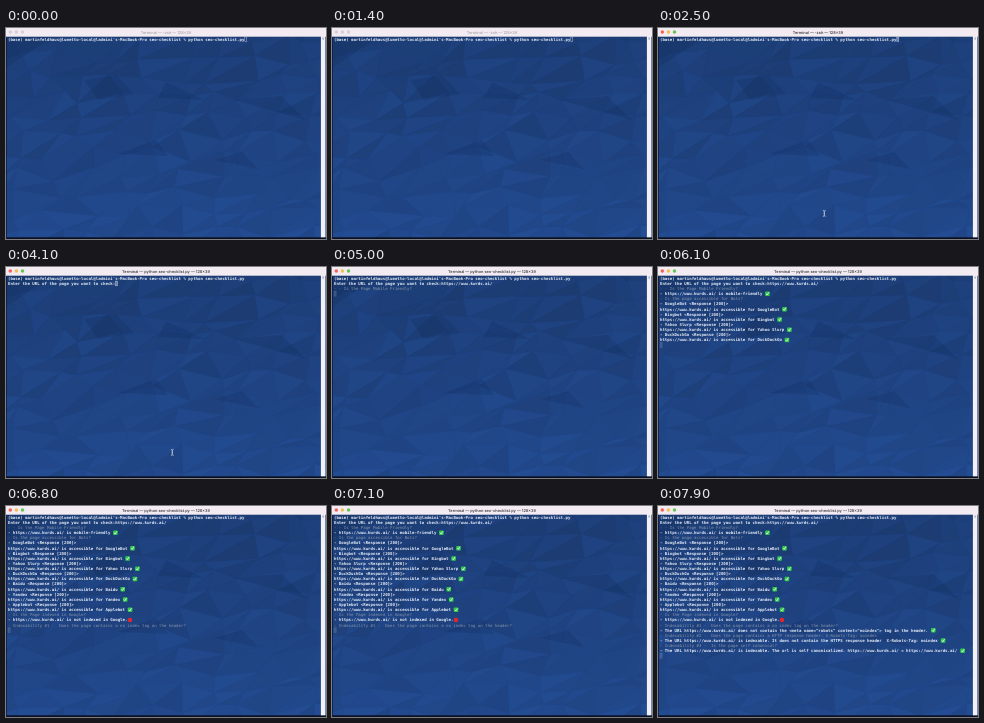
Write an HTML page that moves like this. It is 320 by 211 pixels and loops after 8000 ms.

```html
<!DOCTYPE html>
<html lang="en">
<head>
<meta charset="utf-8">
<title>Terminal</title>
<style>
html, body { margin: 0; width: 100%; height: 100%; overflow: hidden; background: #1c4286; }
svg { display: block; width: 100vw; height: 100vh; }
text { white-space: pre; text-rendering: geometricPrecision; }
.line { font: bold 4.05px "DejaVu Sans Mono", monospace; fill: #e6ecf8; }
.dim { font-weight: normal; fill: #8793a8; }
#title { font: 600 3.9px Inter, sans-serif; text-anchor: middle; }
</style>
</head>
<body>
<svg id="stage" viewBox="0 0 320 211" preserveAspectRatio="none">
  <g id="wall"></g>
  <rect y="209.3" width="320" height="1.7" fill="#0a1022"/>
  <rect y="8" width=".8" height="203" fill="#0e1c40"/>
  <rect x="314.9" y="8" width="4.5" height="201.3" fill="#f3f1f5"/>
  <rect width="320" height="8.7" fill="#f3ebf2"/>
  <rect x="316.3" y="9.3" width="1.7" height="2.6" rx=".8" fill="#b9b7bd"/>
  <g id="lights"></g>
  <text id="title" x="160" y="5.5"></text>
  <g id="screen"></g>
  <rect id="cursor" width="2" height="4.7" stroke="#b4bfd2" stroke-width=".5"/>
  <path id="mouse" d="M164.9 182.4q1.4 0 1.4 1v4q0 1-1.4 1M167.7 182.4q-1.4 0-1.4 1v4q0 1 1.4 1" fill="none" stroke="#c3cde0" stroke-width=".7"/>
</svg>
<script>
const LOOP = 8000, COL = 2.44, ROW = 5.13, LEFT = 2, TOP = 8.9;
const $ = id => document.getElementById(id);

function add(parent, tag, attrs, text = "") {
  const el = document.createElementNS("http://www.w3.org/2000/svg", tag);
  for (const k in attrs) el.setAttribute(k, attrs[k]);
  el.textContent = text;
  parent.append(el);
  return el;
}

// Low-poly wallpaper: a jittered triangle mesh, brighter downwards, with some larger facets
let seed = 11;
const rnd = () => (seed = seed * 16807 % 2147483647) / 2147483647;
const COLS = 11, ROWS = 12, mesh = [];
for (let r = 0; r <= ROWS; r++) {
  mesh.push([]);
  for (let c = 0; c <= COLS; c++)
    mesh[r].push([(c - .5 + (rnd() - .5) * .8) * 32, (r - .5 + (rnd() - .5) * .8) * 19.5]);
}
function facet(points, fill) {
  add($("wall"), "polygon", { points: points.join(" "), fill, stroke: fill, "stroke-width": .4 });
}
for (let r = 0; r < ROWS; r++) for (let c = 0; c < COLS; c++) {
  const [a, b, d, e] = [mesh[r][c], mesh[r][c + 1], mesh[r + 1][c], mesh[r + 1][c + 1]];
  const tone = shift => `hsl(218 61% ${28.6 + r * .5 + shift + (rnd() - .5) * 2.4}%)`;
  facet([a, b, d], tone(.5));
  facet([b, e, d], tone(-.5));
}
[
  "0,9 46,9 0,40",
  "78,52 110,47 128,66 92,72",
  "152,70 160,54 198,72",
  "228,72 275,68 300,92",
  "112,126 150,112 162,128",
  "208,132 236,124 252,141",
].forEach(points => add($("wall"), "polygon", { points, fill: "#0d2350", opacity: .2 }));

const lights = ["#f4605a", "#f6be4f", "#61c554"].map((on, i) =>
  ({ on, el: add($("lights"), "circle", { cx: 4.3 + 6.1 * i, cy: 4, r: 1.75 }) }));

// Terminal output: each line has the time it is shown, its row, text and mark
const url = "https://www.kwrds.ai/", ask = "Enter the URL of the page you want to check:";
const prompt = "(base) martinfeldhaus@lumetto-local@ladmini's-MacBook-Pro seo-checklist % python seo-checklist.py";
const lines = [];
let row = 0;
const say = (time, text, mark) => lines.push({ time, row: row++, text, mark });
const dim = (time, text) => lines.push({ time, row: row++, text, dim: true });

say(0, prompt);
say(3900, ask);
dim(5000, "- - Is the Page Mobile Friendly?");
say(5500, `- ${url} is mobile-friendly `, "ok");
dim(5500, "- Is the page accessible for Bots?");
[["GoogleBot", 5800], ["Bingbot", 5900], ["Yahoo Slurp", 6000], ["DuckDuckGo", 6100],
 ["Baidu", 6200], ["Yandex", 6300], ["Applebot", 6400]].forEach(([bot, t]) => {
  say(t, `- ${bot} <Response [200]>`);
  say(t, `${url} is accessible for ${bot} `, "ok");
});
dim(6400, "- Is the Page indexed in Google?");
say(6700, `- ${url} is not indexed in Google.`, "bad");
dim(6700, "- Indexability #1 -  Does the page contains a no index tag on the header?");
say(7200, `- The URL ${url} does not contain the <meta name="robots" content="noindex"> tag in the header. `, "ok");
dim(7200, "- Indexability #2 -  Does the page contains a HTTP response header: X-Robots-Tag: noindex");
say(7500, `- The URL ${url} is indexable. It does not contain the HTTPS response header  X-Robots-Tag: noindex `, "ok");
dim(7500, "- Indexability #3 -  Is the page self canonical?");
say(7800, `- The URL ${url} is indexable. The url is self canonicalized. ${url} = ${url} `, "ok");

for (const l of lines) {
  l.el = add($("screen"), "g", {});
  const y = TOP + l.row * ROW, x = LEFT + l.text.length * COL;
  l.label = add(l.el, "text", { x: LEFT, y: y + 3.9, class: l.dim ? "line dim" : "line" }, l.text);
  if (l.mark === "ok") {
    add(l.el, "rect", { x: x + .2, y: y + .2, width: 4.6, height: 4.6, rx: .8, fill: "#2fc84c" });
    add(l.el, "path", { d: `M${x + 1.2} ${y + 2.6}l1 1.1 1.7-2.6`, fill: "none", stroke: "#fff", "stroke-width": .8 });
  } else if (l.mark === "bad") {
    add(l.el, "circle", { cx: x + 2.4, cy: y + 2.5, r: 2.3, fill: "#e0282e" });
  }
}

function draw(t) {
  const active = t >= 2200, running = t >= 3000;
  $("title").textContent = `Terminal — ${running ? "python seo-checklist.py" : "-zsh"} — 128×39`;
  $("title").setAttribute("fill", active ? "#454347" : "#b0acb1");
  for (const { on, el } of lights) el.setAttribute("fill", active ? on : "#d6d0d6");

  lines[1].label.textContent = t >= 4800 ? ask + url : ask;
  let last = 0;
  for (const l of lines) {
    const shown = t >= l.time;
    l.el.style.display = shown ? "" : "none";
    if (shown) last = l.row;
  }
  let r = last + 1, c = 0;
  if (!running) [r, c] = [0, prompt.length];
  else if (last === 1) [r, c] = [1, lines[1].label.textContent.length];
  const cursor = $("cursor");
  cursor.setAttribute("x", LEFT + c * COL + .1);
  cursor.setAttribute("y", TOP + r * ROW + .1);
  cursor.setAttribute("fill", active ? "#6680b0" : "none");
  cursor.setAttribute("opacity", last > 1 ? .35 : 1);
  $("mouse").style.display = active && t < 5000 ? "" : "none";
}

function tick() {
  draw(performance.now() % LOOP);
  requestAnimationFrame(tick);
}
tick();
</script>
</body>
</html>
```
